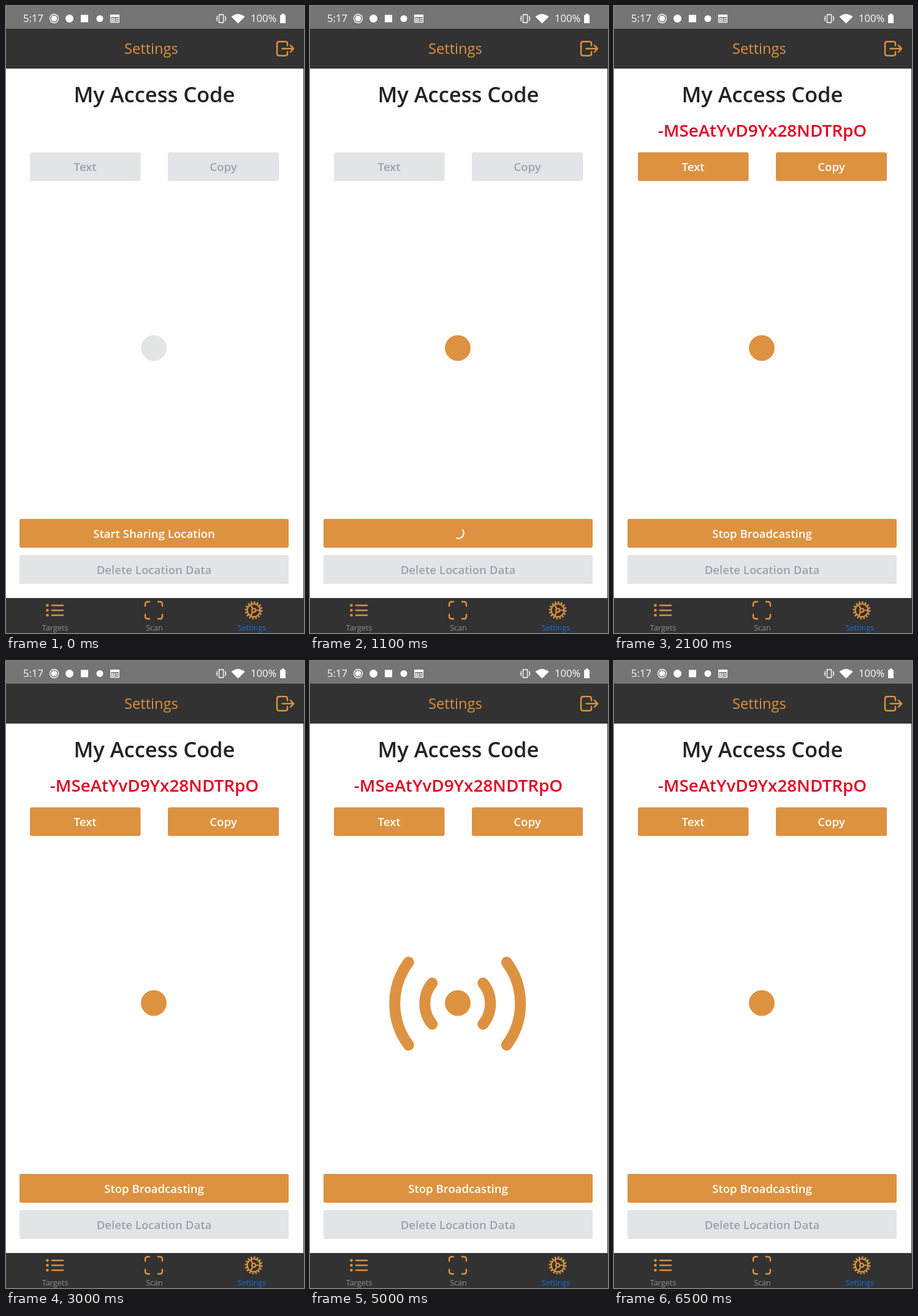
An HTML page for the animation above (6.9 s loop, 486x1022 px).

```html
<!DOCTYPE html>
<html lang="en">
<head>
<meta charset="utf-8">
<title>Settings</title>
<style>
  html, body { margin: 0; width: 100%; height: 100%; overflow: hidden; background: #fff; }
  svg { display: block; width: 486px; height: 1022px; font-family: "Open Sans", "Noto Sans", sans-serif; }
  text { text-anchor: middle; }
  .bold { font-weight: 600; }
  .btn { font-weight: 600; font-size: 18.6px; }
  .tab { font-size: 12.6px; fill: #8f8f8f; }
  .line { fill: none; stroke: #dd9241; stroke-width: 2.5; stroke-linecap: round; stroke-linejoin: round; }
  .thin { fill: none; stroke: #fff; stroke-width: 1.3; }
</style>
</head>
<body>
<svg viewBox="0 0 486 1022">
  <defs><clipPath id="clip"><rect x="22" y="836" width="439" height="47" rx="3"/></clipPath></defs>
  <rect width="486" height="1022" fill="#fefefe"/>
  <rect x="485" y="102" width="1" height="863" fill="#333"/>

  <!-- status bar -->
  <rect width="486" height="36.5" fill="#757575"/>
  <g fill="#fff">
    <g font-size="16.6"><text x="44.5" y="26">5:17</text><text x="420" y="26">100%</text></g>
    <circle class="thin" cx="78.5" cy="20.5" r="7"/><circle cx="78.5" cy="20.5" r="4.8"/>
    <circle cx="103.5" cy="20.5" r="6.5"/>
    <rect x="122" y="14.5" width="12" height="12"/>
    <circle cx="153" cy="20.5" r="5.5"/>
    <path d="M170 14h15v4h-15z"/>
    <path class="thin" d="M170.7 15v11.5h13.6V15M173 20.5h4v3.5h-4zM179 20.5h4M179 23.5h4"/>
    <path class="thin" d="M347.5 14h7v13h-7zM344.5 16v3l-1.5 1.5 1.5 1.5v3M357.5 16v3l1.5 1.5-1.5 1.5v3"/>
    <path d="M367.5 17.5Q378.500 8.500 389.500 17.500L378.500 28.500Z"/>
    <path d="M449.500 12.500h4v2h2.500v13.500h-9v-13.500h2.500z"/>
    <path id="pin" fill-rule="evenodd" d="M328.500 28.500C325 24 322.500 21.500 322.500 18.500a6 6 0 0 1 12 0C334.500 21.500 332 24 328.500 28.500ZM328.500 16.200a2.300 2.300 0 1 0 .01 0Z"/>
  </g>

  <!-- header -->
  <rect y="36.500" width="486" height="65.500" fill="#323232"/>
  <text x="237" y="78" font-size="23.700" fill="#dd9241">Settings</text>
  <path class="line" d="M459 64.500V61.500Q459 58 455.500 58H445.500Q442 58 442 61.500V77.500Q442 81 445.500 81H455.500Q459 81 459 77.500V74.500M450.500 69.500H469M464 64l5 5.500-5 5.500"/>

  <!-- access code -->
  <text class="bold" x="242" y="157" font-size="34.500" fill="#222">My Access Code</text>
  <text id="code" class="bold" x="242" y="213" font-size="27.800" fill="#e3001f">-MSeAtYvD9Yx28NDTRpO</text>
  <g id="pair">
    <rect x="39" y="238.500" width="180.500" height="46.800" rx="3"/>
    <rect x="264" y="238.500" width="181" height="46.800" rx="3"/>
  </g>
  <g id="pairText" class="btn"><text x="129" y="269">Text</text><text x="354.500" y="269">Copy</text></g>

  <!-- beacon -->
  <circle id="dot" cx="241" cy="557.500" r="21"/>
  <g id="waves" fill="none" stroke="#dd9241" stroke-width="18" stroke-linecap="round"></g>

  <!-- main buttons -->
  <rect x="22" y="836" width="439" height="47" rx="3" fill="#dd9241"/>
  <circle id="ripple" cy="859" fill="#fff" clip-path="url(#clip)"/>
  <text id="label" class="btn" x="241.500" y="866.500" fill="#fff"></text>
  <circle id="spinner" cx="242" cy="859" r="8.800" fill="none" stroke="#fff" stroke-width="2" pathLength="1"/>
  <g id="touch">
    <circle cx="329" cy="859" r="15" fill="#9a6a3a" opacity=".12"/>
    <circle cx="329" cy="858.500" r="12" fill="#f8e8d8" opacity=".7"/>
  </g>
  <rect x="22" y="895" width="439" height="47" rx="3" fill="#e2e4e8"/>
  <text class="btn" x="241.500" y="925.500" fill="#9da1a6">Delete Location Data</text>

  <!-- tab bar -->
  <rect y="965" width="486" height="57" fill="#323232"/>
  <path class="line" d="M75 977H93M75 985H93M75 993H93"/>
  <g fill="#dd9241"><circle cx="67.500" cy="977" r="2.300"/><circle cx="67.500" cy="985" r="2.300"/><circle cx="67.500" cy="993" r="2.300"/></g>
  <path class="line" d="M227 978V975.500Q227 971 231.500 971H234M248 971H250.500Q255 971 255 975.500V978M255 992V994.500Q255 999 250.500 999H248M234 999H231.500Q227 999 227 994.500V992"/>
  <g transform="translate(404 985)" fill="none" stroke="#dd9241" stroke-width="2.200">
    <circle r="10.500"/><circle r="13" stroke-width="3" pathLength="32" stroke-dasharray="1"/>
    <circle r="3"/><path d="M3 0H10.500M-1.500 -2.600L-5.200 -9.100M-1.500 2.600L-5.200 9.100"/>
  </g>
  <text class="tab" x="80" y="1018">Targets</text>
  <text class="tab" x="242" y="1018">Scan</text>
  <text class="tab" x="401" y="1018" style="fill:#1371d6">Settings</text>
</svg>
<script>
const LOOP = 6900, STEP = 100, PRESS = 700, START = 900, LIVE = 2100;
const ORANGE = '#dd9241', GREY = '#e2e4e8';
const el = id => document.getElementById(id);
const set = (id, attrs) => { for (const k in attrs) el(id).setAttribute(k, attrs[k]); };
const show = (id, on) => set(id, { visibility: on ? 'visible' : 'hidden' });

// Each wave: inner end offset, bulge offset, half height
const waves = [[41.5, 53.5, 33.5], [80, 102.5, 67.5], [121.5, 155.5, 100.5]];
waves.forEach(([x, bulge, h], i) => {
  const sag = bulge - x, r = (h * h + sag * sag) / (2 * sag);
  const arc = (side, sweep) =>
    `M${240.7 + side * x} ${558.5 - h}A${r} ${r} 0 0 ${sweep} ${240.7 + side * x} ${558.5 + h}`;
  el('waves').insertAdjacentHTML('beforeend', `<path id="wave${i}" d="${arc(-1, 0)}${arc(1, 1)}"/>`);
});

// Cubic ease with control points (.4, 0) and (.2, 1)
function ease(x) {
  if (x <= 0 || x >= 1) return Math.min(1, Math.max(0, x));
  let lo = 0, hi = 1;
  for (let i = 0; i < 20; i++) {
    const u = (lo + hi) / 2, v = 1 - u;
    if (1.2 * v * v * u + 0.6 * v * u * u + u ** 3 < x) lo = u; else hi = u;
  }
  return lo * lo * (3 - 2 * lo);
}

function spin(ms) {
  const p = ms / 1333 % 1;
  const from = 0.75 * ease(2 * p - 1), to = 0.75 * ease(2 * p);
  const turn = from + p / 4 + ms / 3332;
  const len = Math.max(0.03, to - from);
  set('spinner', {
    'stroke-dasharray': `${len} ${1 - len}`,
    transform: `rotate(${turn * 360 - 90} 242 859)`
  });
}

function draw(t) {
  const busy = t >= START && t < LIVE, live = t >= LIVE;
  const p = (t - PRESS) / 300;
  show('touch', t >= PRESS && t <= START);
  show('ripple', p >= 0 && p <= 1);
  set('ripple', {
    cx: 329 - 97 * Math.min(1, Math.max(0, p) * 1.5),
    r: Math.max(0, 20 + 260 * p),
    opacity: t > START ? 0.16 : 0.32
  });

  show('spinner', busy);
  if (busy) spin(t - 840);
  show('pin', t >= 1200 && !live);
  show('code', live);
  show('label', !busy);
  el('label').textContent = live ? 'Stop Broadcasting' : 'Start Sharing Location';
  set('dot', { fill: t >= START ? ORANGE : GREY });
  set('pair', { fill: live ? ORANGE : GREY });
  set('pairText', { fill: live ? '#fff' : '#9da1a6' });

  const count = live ? Math.floor((t - LIVE) / 1000) % 4 : 0;
  waves.forEach((_, i) => show('wave' + i, i < count));
}

const begin = performance.now();
function tick() {
  const t = (performance.now() - begin) % LOOP;
  draw(Math.floor(t / STEP) * STEP);
  requestAnimationFrame(tick);
}
tick();
</script>
</body>
</html>
```
